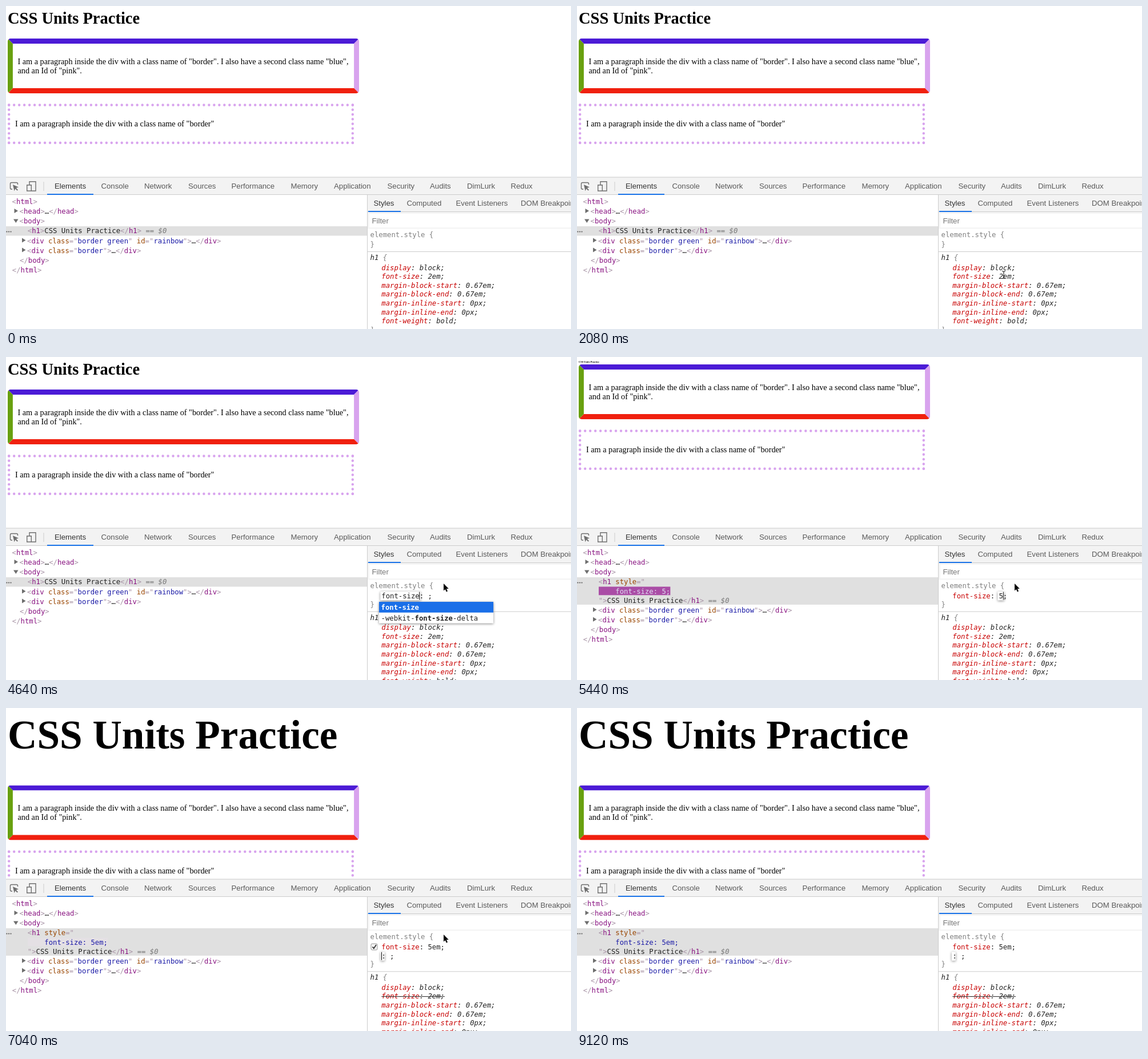
Animation of 989x566 px, one loop 9280 ms. Source, as an HTML page:

```html
<!DOCTYPE html>
<html lang="en">
<head>
<meta charset="utf-8">
<title>CSS Units Practice</title>
<style>
html, body { margin: 0; width: 100%; height: 100%; overflow: hidden; background: #fff; }
svg { display: block; width: 989px; height: 566px; }
text { white-space: pre; }
.serif { font: 14.24px "Liberation Serif", serif; }
.ui { font: 13.2px "Liberation Sans", sans-serif; fill: #5a5a5a; }
.mono { font: 12.25px "DejaVu Sans Mono", monospace; fill: #222; }
.on { fill: #333; }
.i { font-style: italic; }
.b { font-weight: bold; }
.g { fill: #a894a6; }
.t { fill: #881280; }
.a { fill: #994500; }
.v { fill: #1a1aa6; }
.r { fill: #c80000; }
.k { fill: #222; }
.d { fill: #808080; }
.w { fill: #fff; }
.s { fill: #777; font-style: italic; }
.lift { fill: #fff; filter: drop-shadow(0 1px 2px #0007); }
</style>
</head>
<body>
<svg viewBox="0 0 989 566">
  <defs><clipPath id="round"><rect width="615" height="96" rx="5"/></clipPath></defs>
  <g id="page"></g>
  <g id="tools"></g>
  <g id="live"></g>
</svg>
<script>
const LOOP = 9280, STEP = 160, CH = 7.374, ROW = 15.65;
const TYPE_AT = 3360, OPEN_AT = 2880, VALUE_AT = 4800, COMMIT_AT = 6720;
const $ = id => document.getElementById(id);
const esc = s => s.replace(/&/g, '&amp;').replace(/</g, '&lt;');
const rect = (x, y, w, h, fill, more = '') =>
  `<rect x="${x}" y="${y}" width="${w}" height="${h}" fill="${fill}" ${more}/>`;
const shape = (d, more) => `<path d="${d}" ${more}/>`;
const text = (x, y, cls, s, more = '') => `<text x="${x}" y="${y}" class="${cls}" ${more}>${esc(s)}</text>`;

// Each run is a one-letter class followed by its text.
const mono = (x, y, runs, cls = '') => `<text x="${x}" y="${y}" class="mono ${cls}">` +
  runs.map(r => `<tspan class="${r[0]}">${esc(r.slice(1))}</tspan>`).join('') + '</text>';
const open = name => ['g<', 't' + name, 'g>'];
const close = name => ['g</', 't' + name, 'g>'];
const attr = (name, value) => ['a ' + name, 'g="', 'v' + value, 'g"'];

// Page
const SIZES = {
  normal: [28.5, 31, 57],
  tiny: [4.45, 9.8, 13],
  huge: [71.2, 71, 135.4]
};

function drawPage([size, base, top]) {
  const w = 615, h = 96, b = 8.9;
  const side = (pts, fill) => `<polygon points="${pts}" fill="${fill}"/>`;
  const border =
    side(`0,0 ${w},0 ${w - b},${b} ${b},${b}`, '#4b1bd6') +
    side(`${w},0 ${w},${h} ${w - b},${h - b} ${w - b},${b}`, '#d8a3ee') +
    side(`0,${h} ${w},${h} ${w - b},${h - b} ${b},${h - b}`, '#f0200f') +
    side(`0,0 0,${h} ${b},${h - b} ${b},${b}`, '#68a00f');
  const dots = (d, gap) => shape(d,
    `stroke="#d8a3ee" stroke-width="4.45" stroke-linecap="round" stroke-dasharray="0 ${gap}"`);
  const across = 601.6 / 67, down = 66.3 / 8;
  return text(3, base, 'serif b', 'CSS Units Practice', `style="font-size:${size}px"`) +
    `<g transform="translate(3 ${top})"><g clip-path="url(#round)">${border}</g>` +
    text(17.5, 44.6, 'serif', 'I am a paragraph inside the div with a class name of "border". I also have a second class name "blue",') +
    text(17.5, 60.8, 'serif', 'and an Id of "pink".') +
    dots('M2.2 116.4h601.7', across) + dots('M2.2 182.7h601.7', across) +
    dots('M2.2 116.4v66.4', down) + dots('M603.8 116.4v66.4', down) +
    text(13, 154.4, 'serif', 'I am a paragraph inside the div with a class name of "border"') + '</g>';
}

function drawHover() {
  return rect(3, 0, 986, 5, '#f6b26b', 'opacity=".66"') +
    rect(3, 5, 986, 33.3, '#6fa8dc', 'opacity=".66"') +
    rect(3, 38.3, 986, 18.7, '#f6b26b', 'opacity=".66"') +
    shape('M4 64.5h7l7.500-7 7.500 7h64a2 2 0 0 1 2 2v19a2 2 0 0 1-2 2H4a2 2 0 0 1-2-2v-19a2 2 0 0 1 2-2z', 'class="lift"') +
    text(10, 80, 'ui b t', 'h1', 'style="font-size:11px;fill:#881280"') +
    text(36, 80, 'ui', '1302 × 37', 'style="font-size:10.800px;fill:#777"');
}

// Fixed developer tools frame
function drawTools() {
  const tabs = [['Elements', 85], ['Console', 166.500], ['Network', 242], ['Sources', 319], ['Performance', 394.5],
    ['Memory', 498.5], ['Application', 574], ['Security', 667.5], ['Audits', 742], ['DimLurk', 807], ['Redux', 883.5]];
  const panes = [['Styles', 643.5], ['Computed', 701.5], ['Event Listeners', 787.5], ['DOM Breakpoints', 901]];
  const row = (list, y) => list.map(([s, x], i) => text(x, y, i ? 'ui' : 'ui on', s)).join('');
  const icon = 'fill="none" stroke="#6e6e6e" stroke-width="1.4"';
  return rect(0, 299, 989, 267, '#fff') + rect(0, 299.5, 989, 31, '#f3f3f3') +
    rect(0, 299.5, 989, 1, '#ccc') + rect(0, 330, 989, 1, '#ccc') + rect(72, 329, 81, 2, '#1a73e8') +
    shape('M11 321H9.500a2 2 0 0 1-2-2V311.500a2 2 0 0 1 2-2h9a2 2 0 0 1 2 2V313', icon) +
    shape('M12 313l10 4.500-4.300 1.300 3.300 3.400-1.400 1.400-3.400-3.400-1.700 4z', 'fill="#6e6e6e"') +
    shape('M41 313.500V307.700h11v16.300h-7M36.700 313.700h7.600v10.300h-7.600z', icon) +
    rect(65.5, 308, 1, 16, '#ccc') + row(tabs, 320) +
    rect(633, 331, 356, 30, '#f3f3f3') + rect(633, 360, 356, 1, '#ccc') + rect(634, 359, 57, 2, '#1a73e8') +
    row(panes, 349.7) +
    rect(633, 361, 356, 30, '#f5f5f5') + rect(636, 364, 353, 24, '#fff') +
    text(640.5, 381, 'ui', 'Filter', 'style="fill:#757575"') +
    rect(633, 390.5, 356, 175.5, '#fff') + rect(632, 331, 1, 235, '#ccc');
}

// Element tree
const mix = (a, b, k) => `rgb(${a.map((c, i) => Math.round(c + (b[i] - c) * k))})`;

function drawFlash(age, chars) {
  const p = age / 1400;
  if (p < 0 || p >= 1) return ['', '#1a1aa6'];
  const k = 1 - (1 - Math.min(p / .8, 1)) ** 2;
  const alpha = p < .8 ? 1 : ((1 - p) / .2) ** 2;
  return [rect(38, 402.5, 29.5 + chars * CH, 14.8, mix([158, 54, 153], [245, 219, 244], k), `opacity="${alpha}"`),
    mix([255, 255, 255], [26, 26, 166], k)];
}

function drawTree(value, age) {
  const tail = ['kCSS Units Practice', ...close('h1'), 's == $0'];
  const right = (x, y) => shape(`M${x} ${y - 4}l6.500 4-6.500 4z`, 'fill="#6e6e6e"');
  const shift = value ? 32.2 : 0;
  let s = rect(0, 386, 632, value ? 48 : 16.5, '#e0e0e0') +
    [1.5, 5, 8.5].map(x => `<circle cx="${x}" cy="395.500" r="1.100" fill="#555"/>`).join('') +
    mono(10.5, 347, open('html')) +
    right(14.5, 359) + mono(23.5, 364, [...open('head'), 'k…', ...close('head')]) +
    shape('M13 373.500h8.500l-4.200 6.500z', 'fill="#6e6e6e"') + mono(23.5, 381, open('body'));
  if (value) {
    const css = `font-size: ${value};`;
    const [back, ink] = drawFlash(age, css.length);
    s += mono(37.8, 398.3, ['g<', 'th1', 'a style', 'g="']) + back +
      text(67.3, 414.5, 'mono', css, `style="fill:${ink}"`) + mono(37.8, 430.5, ['g">', ...tail]);
  } else {
    s += mono(37.8, 398.3, [...open('h1'), ...tail]);
  }
  const div = (y, ...attrs) => right(28, y - 5) +
    mono(37, y, ['g<', 'tdiv', ...attrs, 'g>', 'k…', ...close('div')]);
  return s + `<g transform="translate(0 ${shift})">` +
    div(415.5, ...attr('class', 'border green'), ...attr('id', 'rainbow')) +
    div(432.5, ...attr('class', 'border')) +
    mono(24, 449.5, close('body')) + mono(10.8, 467, close('html')) + '</g>';
}

// Styles pane
const NAMES = ['font-size', 'font', 'font-family', 'font-weight', 'font-style', 'font-stretch', 'font-kerning',
  'font-feature-settings', 'font-variant', 'float', 'flex', 'filter', '-webkit-font-size-delta', '-webkit-font-smoothing'];
const UA_RULE = [['display', 'block'], ['font-size', '2em'], ['margin-block-start', '0.67em'], ['margin-block-end', '0.67em'],
  ['margin-inline-start', '0px'], ['margin-inline-end', '0px'], ['font-weight', 'bold']];
const LEFT = 657.3, LINE = 422.6;

const field = (x, y, n) => rect(x - 2, y - 11.5, n * CH + 4, 15.5, '#fff', 'class="lift" rx="1"');
const caret = (x, y) => rect(x, y - 11, 1, 14, '#000');
const decl = (y, name, value, cls) => mono(LEFT, y, ['r' + name, `k: ${value};`], cls);

function drawPopup(query) {
  const hits = NAMES.filter(n => n.includes(query));
  const width = Math.max(...hits.map(n => n.length)) * CH + 30.5, row = 18.8;
  return rect(653, 429, width, hits.length * row, '#fff', 'class="lift"') +
    rect(653, 429, width, row, '#1a6fe8') +
    hits.map((n, i) => {
      const at = n.indexOf(query), end = at + query.length, ink = i ? 'k' : 'w';
      return `<text x="656.500" y="${442.7 + i * row}" class="mono"><tspan class="${ink}">${n.slice(0, at)}` +
        `</tspan><tspan class="b ${ink}">${query}</tspan><tspan class="${ink}">${n.slice(end)}</tspan></text>`;
    }).join('');
}

function drawStyles(t, value, over) {
  const extra = t < OPEN_AT ? 0 : t < COMMIT_AT ? 1 : 2;
  const drop = extra * ROW;
  const done = t >= COMMIT_AT;
  let s = mono(637.5, 404.6, ['delement.style {']) + mono(637.5, 422 + drop, ['d}']) +
    rect(633, 430 + drop, 356, 1, '#ccc') + `<g transform="translate(0 ${drop})">` +
    mono(637.5, 445, ['kh1', 'd {'], 'i') +
    UA_RULE.map(([n, v], i) => decl(462.5 + i * ROW, n, v, 'i')).join('') +
    (done ? rect(LEFT, 473.8, 15 * CH, 1, '#222') : '') + mono(637.5, 571.5, ['d}'], 'i') + '</g>';

  if (done) {
    const y = LINE + ROW + .5;
    if (over) {
      s += rect(639, 413, 11, 11, '#f4f4f4', 'rx="2" stroke="#999"') +
        shape('M641.500 418.500l2.300 2.800 4.200-6.300', 'fill="none" stroke="#333" stroke-width="1.800"');
    }
    s += decl(LINE, 'font-size', value) + field(LEFT + .5, y, .4) + mono(LEFT, y, ['k: ;']);
    if ((t - 6600) % 1000 < 500) s += caret(657, y);
  } else if (t >= VALUE_AT) {
    const x = LEFT + 11 * CH;
    s += field(x, LINE, value.length || .4) + decl(LINE, 'font-size', value) + caret(x + value.length * CH, LINE);
  } else if (t >= OPEN_AT) {
    const typed = 'font-size'.slice(0, Math.max(0, (t - TYPE_AT) / STEP + 1));
    const shown = typed && 'font-size';
    s += field(LEFT, LINE, shown.length || .4) +
      mono(LEFT, LINE, ['k' + typed, 'd' + shown.slice(typed.length), 'k: ;']) +
      caret(LEFT + typed.length * CH - .5, LINE);
    if (typed) s += drawPopup(typed);
  }
  return s;
}

// Pointer
const PATH = [[160, 24, 345], [640, 291, 463], [800, 291, 463], [960, 250, 400], [1120, 245, 404.5], [1440, 540, 397],
  [1920, 738, 455], [2080, 747, 471], [2240, 747, 471], [2720, 766, 397], [7520, 766, 397], [8480, 992, 52]];

function pointerAt(t) {
  const i = PATH.findIndex(p => p[0] > t);
  if (i < 1) return null;
  const [t0, x0, y0] = PATH[i - 1], [t1, x1, y1] = PATH[i];
  const k = (t - t0) / (t1 - t0);
  return [x0 + (x1 - x0) * k, y0 + (y1 - y0) * k];
}

function drawPointer([x, y]) {
  const at = `transform="translate(${x} ${y})"`;
  return x > 650 && y > 450
    ? shape('M-3-6.500q3 0 3 2v9q0 2-3 2M3-6.500q-3 0-3 2v9q0 2 3 2M-1.500 1.500h3', `${at} fill="none" stroke="#222" stroke-width="1.100"`)
    : shape('M0 0v12.500l2.800-2.600 2 4.600 2.200-1-2-4.400h3.800z', `${at} stroke="#fff" stroke-width="1" paint-order="stroke"`);
}

function render(t) {
  const [value, since] = t < 5280 ? ['', 0] : t < 5600 ? ['5', 5360] : t < 5760 ? ['5e', 5600] : ['5em', 5760];
  const size = SIZES[{ 5: 'tiny', '5em': 'huge' }[value] || 'normal'];
  const mouse = pointerAt(t);
  const hover = mouse && t >= 960 && mouse[0] < 632;
  const over = mouse && mouse[0] > 632 && mouse[1] > 390;
  $('page').innerHTML = drawPage(size) + (hover ? drawHover() : '');
  $('live').innerHTML = drawTree(value, t - since) + drawStyles(t, value, over) + (mouse ? drawPointer(mouse) : '');
}

let last = -1;
function tick() {
  const t = Math.floor(performance.now() % LOOP / STEP) * STEP;
  if (t !== last) render(last = t);
  requestAnimationFrame(tick);
}
$('tools').innerHTML = drawTools();
tick();
</script>
</body>
</html>
```
